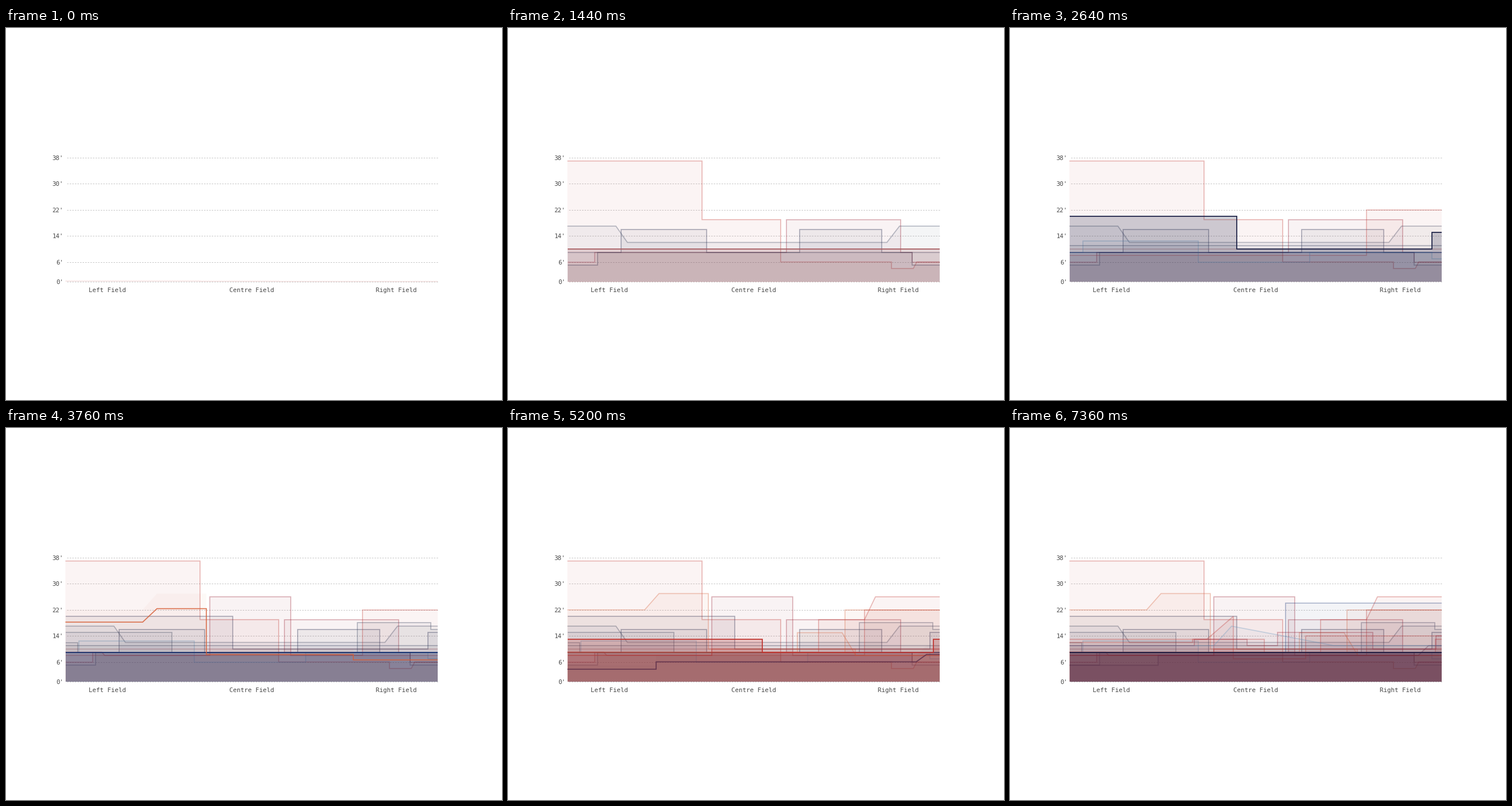
Animation of 864 by 648 pixels, one loop 7440 ms. Source, as a matplotlib script:

```python
import matplotlib.pyplot as plt
from matplotlib.animation import FuncAnimation

W, H, DPI = 864, 648, 100
PX = 72 / DPI
LEFT, RIGHT = 103.5, 752
BASE, FOOT = 441.6, 5.674
FRAMES, STEP = 93, 80
PERIOD, LEAD = 241.8, 0.1
LINE_REST, FILL_REST, FILL_PEAK = 0.33, 0.052, 0.2

RED, WINE, ROSE, ORANGE = "#c0322d", "#961e30", "#a5585c", "#d75f37"
NAVY, BLUE, SLATE, SKY, PLUM = "#161c42", "#143273", "#323e5a", "#6496be", "#552846"

fig = plt.figure(figsize=(W / DPI, H / DPI), dpi=DPI, facecolor="white")
ax = fig.add_axes([0, 0, 1, 1])
ax.set_xlim(0, W)
ax.set_ylim(H, 0)
ax.axis("off")

walls = []


def y_at(feet):
    return BASE - FOOT * feet


def label(x, y, text, align):
    ax.text(x, y, text, ha=align, va="baseline", color="#484848",
            family="DejaVu Sans Mono", size=10.8 * PX, zorder=100)


def wall(color, height, *breaks):
    """Each break is (x, new height), or (x0, x1, new height) for a slope."""
    xs, hs = [LEFT], [height]
    for start, *end, height in breaks:
        xs += [start, *(end or [start])]
        hs += [hs[-1], height]
    xs.append(RIGHT)
    hs.append(hs[-1])
    z = 2 + len(walls)
    area, = ax.fill([LEFT, *xs, RIGHT], [BASE, *map(y_at, hs), BASE],
                    color=color, lw=0, zorder=z)
    line, = ax.plot(xs, hs, color=color, lw=1.7 * PX, zorder=z + 0.5,
                    solid_joinstyle="miter", solid_capstyle="butt")
    walls.append((area, line, hs))


def block(color, base, start, end, height):
    wall(color, base, (start, height), (end, base))


for feet in (0, *range(6, 39, 8)):
    y = y_at(feet)
    ax.plot([106, RIGHT], [y, y], color="#c6c6c6", lw=PX,
            ls=(0, (2.5, 2)), dash_capstyle="butt", zorder=1)
    label(100, y + 4, f"{feet}'", "right")
for i, side in enumerate(("Left", "Centre", "Right")):
    label(176 + 252 * i, 460, side + " Field", "center")

# The walls, in order of appearance.
wall(RED, 37, (338, 19), (475, 6), (668, 4), (706, 712, 6))
wall(WINE, 6, (151, 9), (485, 19), (684, 9), (704, 6))
wall(SLATE, 17, (188, 208, 12), (660, 682, 17))
wall(NAVY, 9, (197, 16), (346, 9), (508, 16), (651, 9))
block(SLATE, 5, 156, 704, 9)
wall(ROSE, 10)
wall(RED, 8, (621, 22))
wall(SKY, 9, (127, 12.5), (328, 6), (522, 9), (735, 7))
wall(SLATE, 11)
wall(BLUE, 9)
wall(NAVY, 20, (395, 10), (735, 15))
wall(WINE, 9, (167, 172, 8), (355, 26), (496, 8))
wall(SLATE, 15, (289, 9))
wall(SLATE, 12, (125, 9), (612, 18), (740, 16))
wall(BLUE, 9)
wall(ORANGE, 22, (238, 263, 27), (349, 10), (605, 8))
wall(RED, 9, (541, 19), (621, 640, 26))
wall(ORANGE, 9, (587, 22))
wall(ORANGE, 9, (504, 15), (582, 606, 8))
wall(RED, 8, (355, 10))
wall(RED, 13, (443, 9), (741, 13))
wall(PLUM, 5, (258, 8), (711, 729, 11))
wall(RED, 12, (318, 13), (343, 389, 20), (389, 7), (515, 14))
wall(WINE, 9)
wall(WINE, 11, (321, 13), (413, 11), (466, 15), (632, 10), (742, 14))
wall(WINE, 8)
wall(SKY, 11, (355, 386, 17), (386, 565, 11))
wall(BLUE, 9, (480, 24))
wall(WINE, 9)
wall(NAVY, 9)


def clamp(v):
    return min(max(v, 0), 1)


def ease(p):
    return 4 * p ** 3 if p < 0.5 else 1 - 4 * (1 - p) ** 3


def update(n):
    now = n * STEP / PERIOD + LEAD
    for i, (area, line, hs) in enumerate(walls):
        age = now - i
        area.set_visible(age > 0)
        line.set_visible(age > 0)
        if age <= 0:
            continue
        grow = clamp(age)
        rise = ease(grow)
        fade = clamp((age - 1.7) / 0.4)
        line.set_ydata([y_at(h * rise) for h in hs])
        line.set_alpha(clamp(grow * 1.3) * (1 - (1 - LINE_REST) * fade))
        peak = FILL_PEAK * grow ** 4
        area.set_alpha(peak + (FILL_REST - peak) * fade)
    return []


anim = FuncAnimation(fig, update, frames=FRAMES, interval=STEP,
                     init_func=lambda: update(0), repeat=True, repeat_delay=0)
plt.show()
```
